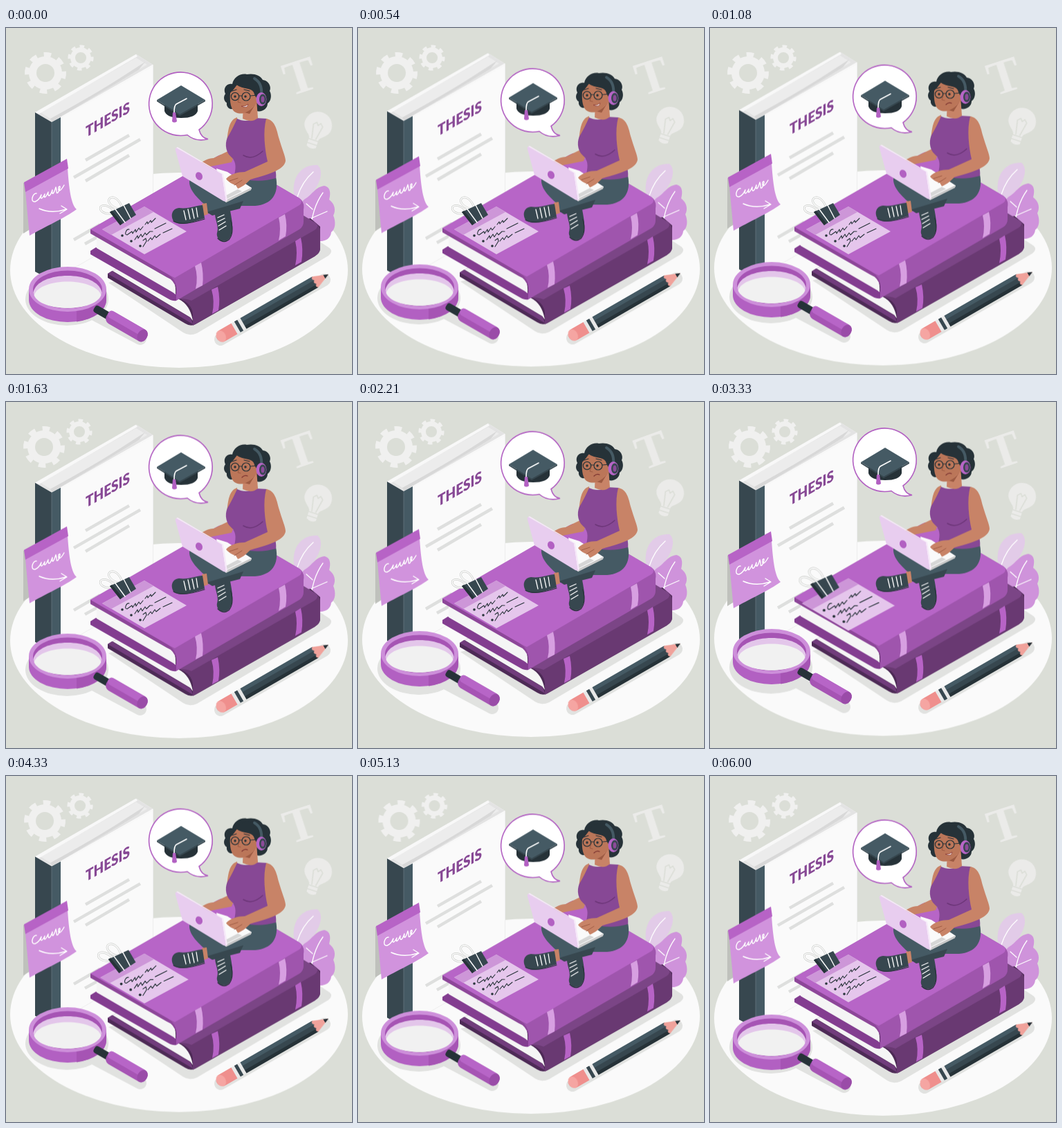
These frames come from a looping animation (500x500 px, 6.04 s). An HTML page without scripts:

```html
<!DOCTYPE html>
<html lang="en">
<head>
<meta charset="utf-8">
<title>Thesis writing</title>
<style>
html, body { margin: 0; width: 100%; height: 100%; overflow: hidden; background: #dbded7; }
svg { display: block; width: 100vw; height: 100vh; }
.up { animation: up 6.04s linear infinite; --d: -9.5px; }
.lens, .cap { --d: -19px; }
.bubble { --d: -29px; }
.memo { --d: -10px; animation-duration: 3.02s; }
.bulb { --d: -10px; animation-duration: 1.51s; }
.list { transform-origin: 200px 291px; animation: swell 6.04s linear infinite; }
.gears { animation: sway 6.04s linear infinite; }
.letter { transform-origin: 425px 70px; animation: rock 6.04s linear infinite; }
.smile { animation: smile 6.04s step-end infinite; }
.frown { animation: frown 6.04s step-end infinite; }
@keyframes up { 50% { transform: translateY(var(--d)); } }
@keyframes swell { 0%, 39%, 82%, 100% { transform: scale(1); } 57% { transform: scale(1.11); } }
@keyframes sway {
  18%, 37% { transform: translateX(-2px); }
  55% { transform: translateX(0); }
  72% { transform: translateX(-1px); }
  85% { transform: translateX(2.5px); }
}
@keyframes rock { 0%, 20%, 70%, 100% { transform: rotate(0); } 37% { transform: rotate(-2deg); } }
@keyframes smile { 0%, 96% { opacity: 1; } 9% { opacity: 0; } }
@keyframes frown { 0%, 96% { opacity: 0; } 9% { opacity: 1; } }
.line { fill: none; stroke-linecap: round; stroke-linejoin: round; }
.skin { fill: #c88367; }
.face { fill: #bb7659; }
.dark { fill: #37474f; }
.ink { fill: #263238; }
</style>
</head>
<body>
<svg viewBox="0 0 500 500">
  <defs>
    <g id="gear" fill="none" stroke="#f0f0ef">
      <circle r="18.5" stroke-width="11"/>
      <circle r="26" stroke-width="8" pathLength="16" stroke-dasharray="1 1" transform="rotate(-5)"/>
    </g>
  </defs>

  <!-- backdrop -->
  <g class="gears">
    <use href="#gear" x="57" y="65"/>
    <use href="#gear" transform="translate(108 43) scale(.62)"/>
  </g>
  <g class="letter">
    <text transform="translate(425 70) rotate(-18)" y="23" text-anchor="middle" font-family="'Liberation Serif', serif" font-weight="700" font-size="70" fill="#ebebe9">T</text>
  </g>
  <g class="up bulb">
    <g transform="translate(451 141) rotate(18)">
      <path d="M-7 32V20C-8 15-20 11-20 0a20 20 0 0 1 40 0C20 11 8 15 7 20V32Q0 37-7 32Z" fill="#ebebe9"/>
      <path class="line" d="M-3 20-7 0l4-4 3 4 3-4 4 4-4 20M-8 22H8M-7 28H7" stroke="#dbded7" stroke-width="1.6"/>
    </g>
  </g>

  <!-- ground and shadows -->
  <g class="up">
    <ellipse cx="250" cy="350" rx="244" ry="141" fill="#fafafa"/>
    <g fill="#e1e2e0">
      <path d="M148 368 256 440Q265 446 276 441L466 329Q474 322 466 317L440 300Z"/>
      <ellipse cx="88" cy="392" rx="60" ry="38"/>
      <path class="line" d="M128 414 194 449M310 450 460 364" stroke="#e1e2e0" stroke-width="18"/>
    </g>
  </g>

  <!-- plant -->
  <g class="up">
    <path d="M417 246C411 218 425 197 450 198 460 206 456 228 430 252Z" fill="#e2cbe8"/>
    <path d="M428 290C427 270 422 254 432 247 442 242 446 230 460 228 470 230 469 241 467 248 475 254 477 263 473 271 477 280 476 291 470 295 469 305 461 309 450 308Z" fill="#cf93db"/>
    <path class="line" d="M421 244Q428 222 444 208M440 295Q442 260 458 238M441 275 464 265M443 262 434 254" stroke="#fff" stroke-width="1.3"/>
  </g>

  <!-- upright book -->
  <g class="up">
    <path d="M42 122 188 38 212 53V281L79 358 66 365Z" fill="#fafafa"/>
    <path d="M42 122 188 38 212 53 66 136Z" fill="#e3e3e3"/>
    <path d="M50 122 188 43 204 53 66 132Z" fill="#ececec"/>
    <path d="M64 131Q130 95 170 69L201 49 192 60Q140 92 67 135Z" fill="#d8d8d8"/>
    <path d="M42 122 188 38 190 41 48 124Z M66 136 212 53 212 56 70 136Z" fill="#f8f8f8"/>
    <path d="M42 122 66 136V365L42 352Z" class="dark"/>
    <path d="M66 136 79 129V358L66 365Z" fill="#455a64"/>
    <path d="M66 136V365" stroke="#6b7c84" stroke-width=".7"/>
    <path d="M212.500 53V281L79 358" fill="none" stroke="#eeeeee"/>
    <text transform="matrix(.86 -.497 0 1 115 158.5)" font-family="Lato, sans-serif" font-weight="900" font-size="22" fill="#874895">THESIS</text>
    <path d="M115 191 178 155M98 216 194 161M115 221 178 184M98 306 136 284M114 312 132 302" stroke="#dedfde" stroke-width="4.500"/>
  </g>

  <g class="up memo">
    <path d="M25 224 30 222 36 290 25 297Z" fill="#bfc1bc"/>
    <path d="M28 236 89 202C91 232 94 255 102 262 86 274 55 288 34 300Z" fill="#d193dd"/>
    <path d="M26 223 88 189 90 203 28 237Z" fill="#b763c6"/>
    <path class="line" d="M44 239C39 238 34 252 42 251 48 249 50 243 51 241 49 248 52 248 56 240 54 247 57 246 61 237 60 245 64 244 67 234 66 243 69 240 72 230 74 236 72 240 75 238 79 232 79 226 76 230 75 238 79 236 84 227M48 261Q66 269 87 262M80 257 88 262 78 268" stroke="#fff" stroke-width="1.4"/>
  </g>

  <!-- stacked books -->
  <g class="up">
    <path d="M147 355 165 345 440 275 454 287V319Q454 325 446 330L274 428Q267 432 259 427L147 361Z" fill="#4d2a56"/>
    <path d="M154 351 165 345 250 392Q266 400 270 423L266 418Z" fill="#f5f5f5"/>
    <path d="M250 391 430 276 448 282Q455 288 454 294V318Q454 325 446 330L270 430V414Q269 398 250 391Z" fill="#693972"/>
    <path d="M250 391 430 271 448 282Q453 287 446 292L268 394Q262 391 250 391Z" fill="#7b4586"/>
    <path d="M147 355 153 351 267 419 270 428Z" fill="#713c7c"/>
    <path d="M297 378 306 374Q310 392 307 408L298 413Q302 395 297 378ZM418 308 426 303Q430 320 427 338L418 343Q422 325 418 308Z" fill="#b763c6"/>

    <path d="M122 322 130 317 246 384V394Q241 395 234 391L122 327Z" fill="#833d90"/>
    <path d="M131 299 236 357Q246 363 245 385L241 382 131 318Z" fill="#f5f5f5"/>
    <path d="M122 291 306 185Q313 181 320 185L424 246Q432 252 430 262V280Q430 287 424 291L246 394V374Q244 363 234 358L122 296Z" fill="#9f55ad"/>
    <path d="M122 291 306 185Q313 181 320 185L424 246Q430 251 424 256L244 361Q240 359 234 356Z" fill="#b765c7"/>
    <path d="M122 291 234 356Q246 363 246 377 243 364 232 360L122 297Z" fill="#8d4699"/>
    <path d="M273 344 282 339Q286 355 284 372L274 377Q278 360 273 344ZM394 274 403 269Q407 285 404 301L394 307Q398 290 394 274Z" fill="#d79fe1"/>
  </g>

  <!-- clipped list -->
  <g class="list">
    <path d="M139 291 200 258 261 294 200 327Z" fill="#e5c6ec"/>
    <path d="M139 291 200 258 213 266 152 299Z" fill="#cd96d8"/>
    <g class="line" stroke="#263238" stroke-width="1.1">
      <path d="M178 291C174 290 170 299 175 299L182 294 183 297 187 291 188 295 192 289 194 292 198 287M201 284 204 280 205 283 209 278 210 281 216 275"/>
      <path d="M186 306 190 300 191 304 195 298 197 302 201 296 203 299 208 294 212 294M215 290 231 282"/>
      <path d="M198 307 202 304 203 308 198 316M205 308 209 303 211 306 215 300 217 303 223 298M227 296 240 290"/>
    </g>
    <g class="ink"><circle cx="168" cy="300" r="1.8"/><circle cx="181" cy="308" r="1.8"/><circle cx="194" cy="315" r="1.8"/></g>
    <path class="line" d="M154 268C142 270 134 264 137 258 142 254 150 258 158 265M164 262C150 258 146 250 150 246 156 242 164 248 168 260" stroke="#c9cbc8" stroke-width="2.800"/>
    <path class="line" d="M154 268C142 270 134 264 137 258 142 254 150 258 158 265M164 262C150 258 146 250 150 246 156 242 164 248 168 260" stroke="#fff" stroke-width="1.4"/>
    <path class="dark" d="M150 266 178 253 188 270 165 285Z"/>
    <path class="ink" d="M150 266 153 264 168 282 165 285Z"/>
    <path class="line" d="M158 262 172 281M170 256 180 275" stroke="#fff" stroke-width="1.4"/>
  </g>

  <!-- student -->
  <g class="up">
    <path d="M266 216C300 222 350 222 390 215 395 240 384 255 360 257L338 257 292 268 286 254C270 240 262 228 266 216Z" fill="#455a64"/>
    <path class="dark" d="M290 266 343 250 338 261 298 271Z"/>
    <path class="skin" d="M283 254 290 253 292 269 284 272Z"/>
    <path class="dark" d="M284 256 287 275C270 280 255 287 243 280 237 273 239 261 250 260 264 262 275 256 284 256ZM302 268 324 264C327 280 330 296 322 305 314 312 303 305 305 296 308 286 302 278 302 268Z"/>
    <path class="line" d="M257 264 260 277M263 262 266 276M269 261 272 275M275 260 277 273M306 274 315 270M306 280 316 275M307 286 317 280M308 292 318 286" stroke="#fff" stroke-width="1.3"/>
    <path class="line" d="M242 279Q254 287 287 276M325 278Q330 297 322 306 314 312 306 304" stroke="#263238" stroke-width="1.2"/>

    <path class="skin" d="M334 129C322 133 321 148 319 165L327 175 300 188C292 188 286 192 280 196L291 201 326 194 335 170Z"/>
    <path d="M334 131C342 135 352 135 360 130L377 131C383 150 385 170 384 185 390 205 391 212 390 217 370 223 345 222 330 212 333 200 332 192 325 186 316 178 316 163 322 155 326 148 330 140 334 131Z" fill="#874895"/>
    <path class="line" d="M343 184Q356 192 371 178M384 185 378 200" stroke="#6d3679" stroke-width="1.5"/>

    <path d="M304 203 320 208 355 231 354 234 318 252 312 247Z" fill="#fafafa"/>
    <path d="M318 252 354 234V231L317 249Z" fill="#c8c8c8"/>
    <path d="M316 243 335 233 341 236 319 247Z" fill="#d6d6d6"/>
    <path d="M246 173Q244 174 245 177L255 214 314 250 318 251 312 211Z" fill="#e8cdef"/>
    <path d="M246 173 312 211 318 251 320 249 314 211 248 172Z" fill="#f6e8f9"/>
    <ellipse cx="279" cy="214" rx="4.800" ry="6" transform="rotate(-25 279 214)" fill="#b260c2"/>

    <path class="skin" d="M376 131C388 133 391 145 394 158 399 175 404 186 404 192 402 204 385 210 353 219 346 226 341 230 335 232L332 227C327 226 321 222 318 218 324 211 335 208 345 208L378 193C374 175 371 150 376 131Z"/>
    <path class="line" d="M323 221 335 217M330 227 341 220" stroke="#9c5a42" stroke-width=".9"/>

    <path class="ink" d="M318 97C312 88 319 79 327 81 329 71 339 65 348 67 357 65 368 68 371 75 379 76 384 84 381 91 385 98 382 107 378 109 378 117 370 122 362 120L334 120Z"/>
    <path class="ink" d="M321 92C312 97 315 106 319 108 318 114 323 118 327 117L332 98Z"/>
    <path class="skin" d="M343 112 362 102 364 130Q355 138 342 131Z"/>
    <path d="M344 122Q354 120 361 109L352 124Z" fill="#9c5a42"/>
    <path class="face" d="M324 94C323 107 325 119 332 122 341 126 350 122 356 114L366 106 363 88 334 82Z"/>
    <path class="ink" d="M322 95C326 92 331 87 333 82 343 89 354 86 358 93 360 99 361 101 366 103L369 82 348 70 330 80Z"/>
    <g fill="none" stroke="#263238" stroke-width="1.2">
      <circle cx="331" cy="99" r="5.600"/><circle cx="347" cy="99" r="6"/>
      <path class="line" d="M337 98 341 98M353 98 364 97M327 91 333 89M344 89 352 91"/>
    </g>
    <g class="ink"><circle cx="331" cy="99" r="1.7"/><circle cx="346" cy="99" r="1.7"/></g>
    <path class="line" d="M338 99 335 107 339 108" stroke="#9c5a42"/>
    <path class="smile" d="M340 113Q346 114 350 110 349 117 340 113Z" fill="#fff" stroke="#8f3f3c" stroke-width=".8"/>
    <path class="line frown" d="M341 114Q345 110 349 112" stroke="#7d3532" stroke-width="1.2"/>
    <path class="line" d="M359 73Q371 80 369 98" stroke="#455a64" stroke-width="4"/>
    <ellipse cx="369" cy="103" rx="7.500" ry="10" fill="#b765c7"/>
    <ellipse cx="371" cy="103" rx="5" ry="7.500" class="dark"/>
    <ellipse cx="371" cy="103" rx="2.500" ry="4.500" fill="#8c4a99"/>
  </g>

  <!-- thought -->
  <path class="up bubble" d="M262 154.500A45.800 45.800 0 1 1 279 147Q282 159 292 160.500 274 165 262 154.500Z" fill="#fff" stroke="#b260c2" stroke-width="1.6"/>
  <g class="up cap">
    <path class="ink" d="M229 106V120Q232 130 253 130 274 130 277 120V106Z"/>
    <path d="M218 104 253 83 288 104 251 125Z" fill="#455a64"/>
    <path d="M218 104 251 125 288 104V106L251 127 218 106Z" class="dark"/>
    <path class="line" d="M261 102 246 110Q243 112 243 122" stroke="#fff" stroke-width="1.6"/>
    <path d="M241 122H245L247 135Q243 138 240 135Z" fill="#b260c2"/>
  </g>

  <!-- magnifier -->
  <g class="up lens">
    <path d="M33 377V393A56 32 0 0 0 145 393V377Z" fill="#b260c2"/>
    <path d="M102 408V424.500A56 32 0 0 0 145 393V377Z" fill="#a654b4"/>
    <ellipse cx="89" cy="377.500" rx="56" ry="32.500" fill="#cd8fda"/>
    <ellipse cx="89" cy="378" rx="50" ry="27.500" fill="#a654b4"/>
    <path d="M39.500 382C46 350 132 350 138.500 382 132 412 46 412 39.500 382Z" fill="#e3c6ea"/>
    <path d="M40.500 386C50 360 128 360 137.500 386 128 411 50 411 40.500 386Z" fill="#f1f1f1"/>
    <g transform="translate(128 404) rotate(30)">
      <rect x="0" y="-5" width="28" height="11" rx="4" class="ink"/>
      <rect x="21" y="-9" width="66" height="19" rx="8" fill="#a654b4"/>
      <rect x="21" y="-9" width="62" height="11" rx="5" fill="#b765c7"/>
      <ellipse cx="80" cy="0.500" rx="7" ry="9.500" fill="#9a4ca8"/>
    </g>
  </g>

  <!-- pencil -->
  <g class="up">
    <g transform="translate(317 442) rotate(-30)">
      <path d="M15-9V9H-6Q-14 7-14 0-14-7-6-9Z" fill="#ef8f8d"/>
      <ellipse cx="-7" cy="0" rx="6.500" ry="9" fill="#f5a5a2"/>
      <path d="M15-9H31V9H15Z" fill="#e8e8e8"/>
      <path d="M20-9H25V9H20Z" class="dark"/>
      <path d="M30-9H150V9H30Z" class="dark"/>
      <path d="M30-9H150V-3H30Z" fill="#455a64"/>
      <path d="M30 4H150V9H30Z" class="ink"/>
      <path d="M150-9 172 0 150 9Q146 6 150 3 146 0 150-3 146-6 150-9Z" fill="#f0a29b"/>
      <path d="M165-3 172 0 165 3Z" class="ink"/>
    </g>
  </g>
</svg>
</body>
</html>
```
